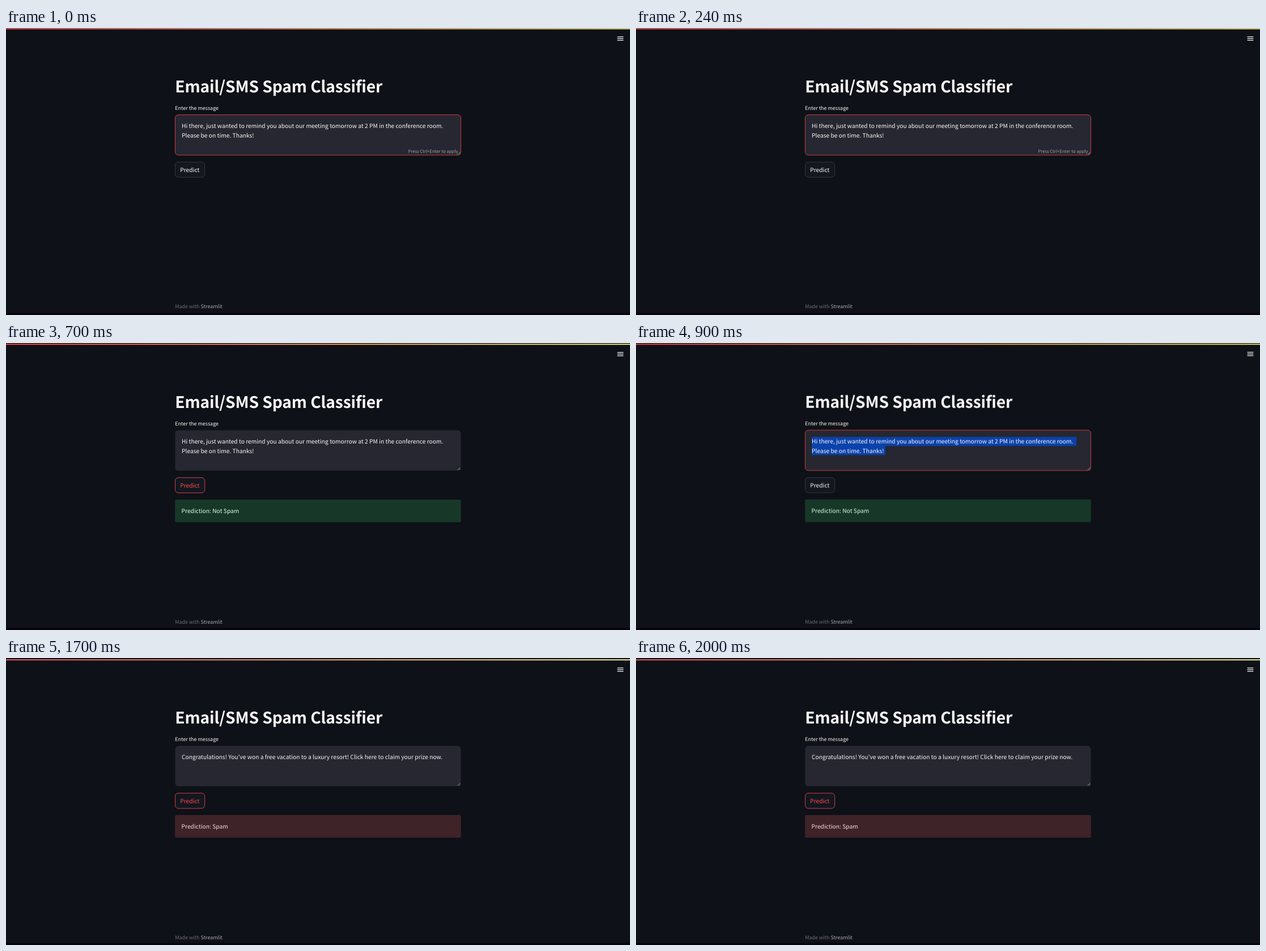
Write an HTML page that moves like this. It is 1101 by 508 pixels and loops after 2.2 s.

```html
<!DOCTYPE html>
<html lang="en">
<head>
<meta charset="utf-8">
<title>Spam classifier demo</title>
<style>
  html, body { margin: 0; width: 100%; height: 100%; overflow: hidden; background: #0e1117; }
  svg { display: block; width: 1101px; height: 508px; }

  text {
    font-family: "Noto Sans CJK JP", "Noto Sans CJK SC", "Noto Sans CJK", "Open Sans", sans-serif;
    font-size: 10.268px;
    fill: #fafafa;
    text-rendering: geometricPrecision;
    white-space: pre;
  }
  .title { font-size: 28.24px; font-weight: 700; letter-spacing: -.005em; }
  .label, .footer { font-size: 8.985px; }
  .hint { font-size: 7.7px; fill: #a0a1a5; }
  .footer { fill: #6c6e72; }
  .footer .app { fill: #a9abae; }

  .field { fill: #262730; }
  .outline { fill: none; stroke: #ff4b4b; stroke-width: .75; }
  .button { fill: #131720; stroke: #41444c; stroke-width: .75; }
  .hot .button { stroke: #ff4b4b; }
  .hot text { fill: #ff4b4b; }
  .grip { stroke: #b9babd; stroke-width: .75; }
  .selection { fill: #0b42ab; }
  .ham rect { fill: #173828; }
  .ham text { fill: #dffde9; }
  .spam rect { fill: #3e2328; }
  .spam text { fill: #ffdede; }

  /* Scenes: typed 0-400, result 400-900, selected 900-1300, retyped 1300-1700, result 1700-2200 ms */
  .page, .page [class*="on-"] { animation: 2200ms step-end infinite; }
  .page { animation-name: drift; }
  .page .on-edit { animation-name: edit; }
  .page .on-focus { animation-name: focus; }
  .page .on-click { animation-name: click; }
  .page .on-select { animation-name: select; }
  .page .on-first { animation-name: first; }
  .page .on-second { animation-name: second; }
  .page .on-ham { animation-name: ham; }
  .page .on-spam { animation-name: spam; }
  .page .on-dull { animation-name: dull; }

  @keyframes drift {
    0% { transform: translateY(0); }
    18.1818% { transform: translateY(1px); }
    40.9091% { transform: translateY(.7px); }
    59.0909% { transform: translateY(-.8px); }
    77.2727%, 100% { transform: translateY(1.9px); }
  }
  @keyframes edit { 0%, 59.0909% { opacity: 1; } 18.1818%, 77.2727%, 100% { opacity: 0; } }
  @keyframes focus { 0%, 40.9091% { opacity: 1; } 18.1818%, 77.2727%, 100% { opacity: 0; } }
  @keyframes click { 0%, 40.9091% { opacity: 0; } 18.1818%, 77.2727%, 100% { opacity: 1; } }
  @keyframes select { 0%, 59.0909%, 100% { opacity: 0; } 40.9091% { opacity: 1; } }
  @keyframes first { 0% { opacity: 1; } 59.0909%, 100% { opacity: 0; } }
  @keyframes second { 0% { opacity: 0; } 59.0909%, 100% { opacity: 1; } }
  @keyframes ham { 0%, 59.0909%, 100% { opacity: 0; } 18.1818% { opacity: 1; } }
  @keyframes spam { 0% { opacity: 0; } 77.2727%, 100% { opacity: 1; } }
  @keyframes dull { 0%, 77.2727%, 100% { opacity: 1; } 18.1818% { opacity: 0; } }
</style>
</head>
<body>
<svg viewBox="0 0 1101 508" xmlns="http://www.w3.org/2000/svg">
  <defs>
    <linearGradient id="vivid">
      <stop stop-color="#ff4b4b"/><stop offset="1" stop-color="#fffd80"/>
    </linearGradient>
    <linearGradient id="muted">
      <stop stop-color="#c0565a"/><stop offset="1" stop-color="#ded796"/>
    </linearGradient>
    <rect id="alert" x="298.2" y="276.3" width="504.6" height="40" rx="2.9"/>
    <rect id="area" x="298.5" y="153.6" width="504" height="71.4" rx="5.5"/>
    <rect id="push" x="298.5" y="237.3" width="52.2" height="26.9" rx="5.5"/>
  </defs>

  <rect width="1101" height="508" fill="#0e1117"/>

  <g class="page">
    <rect y=".4" width="1101" height="1.8" fill="url(#vivid)"/>
    <rect class="on-dull" y=".4" width="1101" height="1.8" fill="url(#muted)"/>
    <path d="M1078.6 15.6h10.8m-10.8 3h10.8m-10.8 3h10.8" stroke="#fafafa" stroke-width="1.2"/>

    <text class="title" x="298.2" y="114">Email/SMS Spam Classifier</text>
    <text class="label" x="298.2" y="145.3">Enter the message</text>

    <use href="#area" class="field"/>
    <use href="#area" class="outline on-focus"/>
    <path class="selection on-select" d="M310 165.4h467v16h-337v16h-130z"/>
    <g class="on-first">
      <text x="310" y="177.4">Hi there, just wanted to remind you about our meeting tomorrow at 2 PM in the conference room.</text>
      <text x="310" y="193.5">Please be on time. Thanks!</text>
    </g>
    <text class="on-second" x="310" y="177.4">Congratulations! You've won a free vacation to a luxury resort! Click here to claim your prize now.</text>
    <text class="hint on-edit" x="709.4" y="221.2">Press Ctrl+Enter to apply</text>
    <path class="grip" d="M796.8 224l4.8-4.8M799.6 224l2-2"/>

    <g>
      <use href="#push" class="button"/>
      <text x="307.2" y="254.8">Predict</text>
    </g>
    <g class="hot on-click">
      <use href="#push" class="button"/>
      <text x="307.2" y="254.8">Predict</text>
    </g>

    <g class="on-ham"><g class="ham">
      <rect x="298.2" y="276.3" width="504.6" height="40" rx="2.9"/>
      <text x="309.6" y="300.2">Prediction: Not Spam</text>
    </g></g>
    <g class="on-spam"><g class="spam">
      <rect x="298.2" y="276.1" width="504.6" height="40" rx="2.9"/>
      <text x="309.6" y="300">Prediction: Spam</text>
    </g></g>

    <text class="footer" x="298.2" y="496">Made with <tspan class="app">Streamlit</tspan></text>
  </g>

  <rect y="504.5" width="1101" height="3.5" fill="#08030d"/>
</svg>
</body>
</html>
```
